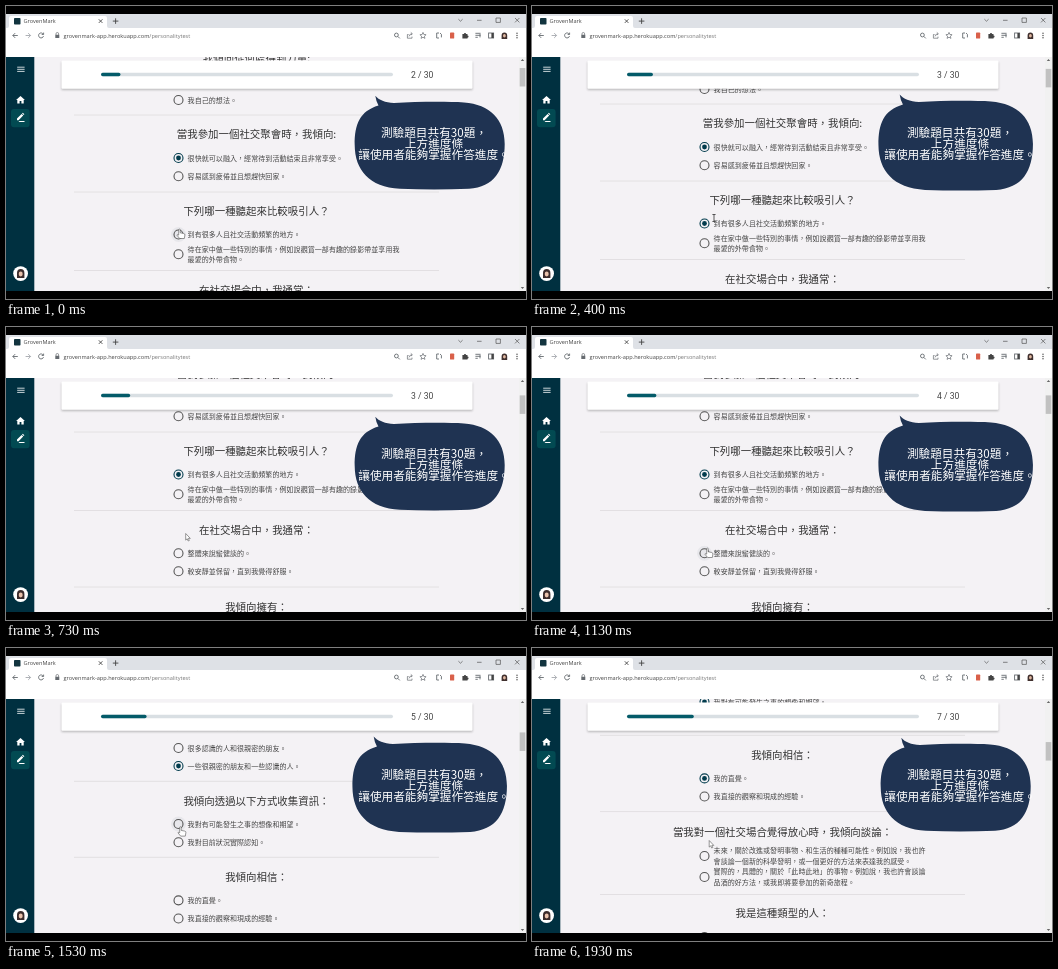
An HTML page for the animation above (1990 ms loop, 520 by 293 pixels).

```html
<!DOCTYPE html>
<html lang="zh-TW">
<head>
<meta charset="utf-8">
<title>Personality test</title>
<style>
html, body { margin: 0; width: 100%; height: 100%; overflow: hidden; background: #000; }
svg { display: block; width: 520px; height: 293px; }
text { font-family: "Noto Sans CJK TC", "Noto Sans CJK", "Noto Sans CJK JP", sans-serif; white-space: pre; }
.ui { font-family: "Open Sans", "Noto Sans", sans-serif; font-size: 5.6px; }
.head { font-size: 10.45px; font-weight: 300; fill: #333; text-anchor: middle; }
.opt { font-size: 7px; font-weight: 300; letter-spacing: .066px; fill: #444; }
.say { font-size: 11.67px; fill: #fff; text-anchor: middle; }
.ico { fill: none; stroke: #666b70; stroke-width: .9; }
.cur { fill: #fff; stroke: #555; stroke-width: .6; stroke-linejoin: round; }
</style>
</head>
<body>
<svg viewBox="0 0 520 293" xmlns="http://www.w3.org/2000/svg">
  <defs>
    <clipPath id="view"><rect x="28" y="51" width="485" height="234"/></clipPath>
    <filter id="soft" x="-5%" y="-30%" width="110%" height="170%"><feGaussianBlur stdDeviation="1.2"/></filter>
  </defs>
  <rect width="520" height="293"/>
  <rect y="8" width="520" height="277" fill="#fff"/>

  <!-- browser bar -->
  <rect y="8" width="520" height="14" fill="#dee1e6"/>
  <path d="M1 22q2 0 2-2v-8q0-2 2-2h94q2 0 2 2v8q0 2 2 2z" fill="#fff"/>
  <rect x="8" y="12" width="6.5" height="6.5" rx=".8" fill="#12343f"/>
  <text class="ui" x="17.5" y="17.4" fill="#444">GrovenMark</text>
  <g class="ico">
    <path d="M92.8 13.3l3.6 3.6m0-3.6l-3.6 3.6M106.8 15.1h5.6m-2.8-2.8v5.6" stroke="#444"/>
    <path d="M452.4 13.2l2.1 2 2.1-2M471 14.3h4.6M490 12h4.4v4.4h-4.4zM509 12l4.4 4.4m0-4.4l-4.4 4.4" stroke="#555" stroke-width=".7"/>
    <path d="M11.8 29.5h-5m2.4-2.4l-2.4 2.4 2.4 2.4"/>
    <path d="M19.6 29.5h5m-2.4-2.4l2.4 2.4-2.4 2.4" stroke="#a5a9ae"/>
    <path d="M37.2 28.1a2.5 2.5 0 1 0 .3 2M37.6 26.6v1.9h-1.9"/>
    <path d="M50 29v-1.2a1.3 1.3 0 0 1 2.6 0V29" stroke-width=".7"/>
    <rect x="49.3" y="28.8" width="4" height="3.2" fill="#666b70" stroke="none"/>
    <circle cx="390.4" cy="29" r="1.9"/><path d="M391.8 30.4l2 2"/>
    <path d="M402.6 28.5h-1.2v3.7h4.6v-1.6M403 30.4q.4-2.6 3-2.6m-1.2-1.4l1.6 1.4-1.6 1.4" stroke-width=".7"/>
    <path d="M417 26.4l.9 2.1 2.2.2-1.7 1.5.5 2.2-1.9-1.2-1.9 1.2.5-2.2-1.7-1.5 2.2-.2z" stroke-width=".7"/>
    <path d="M433 27h-2.3v5h2.3M434 27q2.2.6 1.4 4.4"/>
  </g>
  <rect x="444" y="26.6" width="4.2" height="6" rx=".7" fill="#d9604a"/>
  <path d="M456.4 28h1.5a1.1 1.1 0 0 1 2.2 0h1.4v1.5a1.1 1.1 0 0 1 0 2.2v.8h-5.1z" fill="#444"/>
  <path class="ico" d="M469.4 27.3h5.2M469.4 29.3h5.2M469.4 31.3h2.4M474 28v3.4"/>
  <rect class="ico" x="482.6" y="27" width="5" height="5"/><path d="M485.4 27h2.2v5h-2.2z" fill="#444"/>
  <path d="M495.6 33v-3.5a2.8 3 0 0 1 5.6 0V33z" fill="#40302e"/>
  <ellipse cx="498.4" cy="29.8" rx="1.4" ry="1.7" fill="#e0b9a2"/>
  <g fill="#444"><circle cx="511" cy="27.2" r=".7"/><circle cx="511" cy="29.5" r=".7"/><circle cx="511" cy="31.8" r=".7"/></g>
  <text class="ui" x="57.5" y="31.5" fill="#444">grovenmark-app.herokuapp.com<tspan fill="#777">/personalitytest</tspan></text>

  <!-- page -->
  <rect x="28" y="51" width="485" height="234" fill="#f4f2f5"/>
  <g clip-path="url(#view)">
    <g id="page"></g>
    <rect x="55.5" y="56" width="411" height="28" fill="#000" opacity=".24" filter="url(#soft)"/>
    <rect x="55.5" y="54.5" width="411" height="28.3" rx="1" fill="#fff"/>
  </g>
  <rect x="95" y="66.8" width="292" height="3.4" rx="1.7" fill="#d9dfe3"/>
  <rect id="bar" x="95" y="66.8" height="3.4" rx="1.7" fill="#045b69"/>
  <text id="count" x="405" y="71.7" font-size="8.6" fill="#444" style="font-family:Roboto,sans-serif"></text>

  <!-- scrollbar -->
  <rect x="513" y="51" width="7" height="234" fill="#f1f1f1"/>
  <path d="M514.8 55l1.7-2 1.7 2zM514.8 281l1.7 2 1.7-2z" fill="#666"/>
  <rect id="thumb" x="513.7" width="5.6" height="18.5" fill="#c1c1c1"/>

  <!-- sidebar -->
  <rect y="51" width="28.3" height="234" fill="#003040"/>
  <rect x="5" y="103" width="18.6" height="18.3" rx="3" fill="#024a52"/>
  <path d="M11.2 61.2h7.4M11.2 63.3h7.4M11.2 65.4h7.4" stroke="#dfe6e8" stroke-width=".9"/>
  <path d="M14.5 90l4.4 4h-1.2v3.4h-2.3v-2.4h-1.8v2.4h-2.3V94h-1.2z" fill="#fff"/>
  <path d="M11 114.2v-1.6l4.6-4.6 1.6 1.6-4.6 4.6zM16 107.5l.8-.8 1.6 1.6-.8.8zM13.5 115h5v1h-6z" fill="#fff"/>
  <circle cx="14.6" cy="267.6" r="7.4" fill="#fff"/>
  <path d="M11 272v-5a3.7 3.9 0 0 1 7.4 0v5z" fill="#3c2c2c"/>
  <ellipse cx="14.7" cy="268" rx="2" ry="2.4" fill="#e9c1ab"/>

  <!-- caption -->
  <path id="bubble" fill="#1f3352" d="M369.3 89.7C373 94 379 96.6 388 97C410 95.600 440 95.400 458 96.400C484 98.500 498.600 113 498.700 138C498.600 165 488 181 463 182.800Q428 184 394 182.800C363 181 348.900 164 348.700 139C348.500 118 354 105 372.500 99.500Q370 95 369.300 89.700Z"/>
  <text class="say" x="428" y="130.500">測驗題目共有30題，</text>
  <text class="say" x="428" y="142">上方進度條</text>
  <text class="say" x="428" y="153.300">讓使用者能夠掌握作答進度。</text>

  <g id="pointer">
    <path class="cur" id="hand" d="M-2.300 -4.500q.8-.8 1.500 0V-1.200l3.600.7q1.200.3 1.100 1.500L3.300 4.500h-4.600L-4 1.300q-.3-1.200 1.700-.2z"/>
    <path class="cur" id="arrow" d="M-.8-3.500v6.600l1.500-1.300 1 2.200 1.100-.5-1-2.100h2z"/>
    <path id="beam" d="M-1.600-3.500h3.200M0-3.500v7M-1.600 3.500h3.200" fill="none" stroke="#333" stroke-width=".8"/>
  </g>
</svg>
<script>
const LOOP = 1990, TICK = 200 / 3, NEVER = 1e9;
const $ = id => document.getElementById(id);

// title y, title, divider y, options: [y, lines, time chosen]
const questions = [
  [52, "我傾向從何處得到力量:", 109, [[76, ["他人的想法。"], 0], [94, ["我自己的想法。"]]]],
  [128, "當我參加一個社交聚會時，我傾向:", 186, [
    [152, ["很快就可以融入，經常待到活動結束且非常享受。"], 0],
    [170.3, ["容易感到疲倦並且想趕快回家。"]]]],
  [205, "下列哪一種聽起來比較吸引人？", 264.5, [
    [228.5, ["到有很多人且社交活動頻繁的地方。"], 330],
    [248.2, ["待在家中做一些特別的事情，例如說觀賞一部有趣的錄影帶並享用我", "最愛的外帶食物。"]]]],
  [284, "在社交場合中，我通常：", 341, [
    [307.2, ["整體來說蠻健談的。"], 1190],
    [325.3, ["較安靜並保留，直到我覺得舒服。"]]]],
  [360.5, "我傾向擁有：", 417.3, [
    [384, ["很多認識的人和很親密的朋友。"]],
    [402, ["一些很親密的朋友和一些認識的人。"], 1440]]],
  [437, "我傾向透過以下方式收集資訊：", 493.3, [
    [460, ["我對有可能發生之事的想像和期望。"], 1580],
    [478.3, ["我對目前狀況實際認知。"]]]],
  [512.8, "我傾向相信：", 569.6, [
    [536.4, ["我的直覺。"], 1830],
    [554.5, ["我直接的觀察和現成的經驗。"]]]],
  [589.5, "當我對一個社交場合覺得放心時，我傾向談論：", 652.5, [
    [614, ["未來，關於改進或發明事物、和生活的種種可能性。例如說，我也許", "會談論一個新的科學發明，或一個更好的方法來表達我的感受。"]],
    [635, ["實際的，具體的，關於「此時此地」的事物。例如說，我也許會談論", "品酒的好方法，或我即將要參加的新奇旅程。"]]]],
  [671, "我是這種類型的人：", 728, [[695, ["喜歡先看到整體。"]]]]
];

const scrolls = [[0, 0], [367, 0], [400, 11], [467, 58], [533, 81], [1200, 81], [1333, 203],
  [1440, 203], [1533, 284], [1600, 284], [1733, 365.6], [1830, 365.6], [1920, 406]];
const moves = [[0, 175, 228], [270, 175, 228], [400, 182, 212], [733, 180.5, 210], [867, 180, 211],
  [1000, 177, 226], [1200, 177, 226], [1333, 178.5, 213.5], [1400, 176, 200], [1467, 176, 198],
  [1550, 176, 180], [1733, 176.3, 183.5], [1830, 176.3, 183.5], [1933, 178, 196]];
const shapes = [[0, "hand"], [330, "beam"], [500, "arrow"], [900, "hand"], [1230, "arrow"], [1370, "hand"], [1860, "arrow"]];
const hovers = [[0, 228.5], [380, NEVER], [1000, 307.2], [1260, 402], [1500, 460], [1640, 536.4], [1860, NEVER]];
const clicks = [270, 1130, 1400, 1535, 1765];

const lerp = (table, t, col = 1) => {
  const i = table.findIndex(row => row[0] > t);
  if (i < 0) return table[table.length - 1][col];
  const a = table[i - 1], b = table[i];
  return a[col] + (b[col] - a[col]) * (t - a[0]) / (b[0] - a[0]);
};
const latest = (table, t) => table.filter(row => row[0] <= t).pop()[1];

const radio = (y, at = NEVER) => `<g class="radio" data-at="${at}">
  <circle cx="172.5" cy="${y}" r="4.5" fill="none" stroke-width="1.1"/>
  <circle cx="172.5" cy="${y}" r="2.4" fill="#023c4d"/></g>`;
const option = ([y, lines, at]) => radio(y, at) + lines.map((s, i) =>
  `<text class="opt" x="181.6" y="${y + 2.6 + (i - (lines.length - 1) / 2) * 10.4}">${s}</text>`).join("");

$("page").innerHTML = `<circle id="ripple" cx="172.5" r="7.5" fill="#003040" opacity=".05"/>` +
  questions.map(([y, title, rule, options]) =>
    `<text class="head" x="250.5" y="${y + 4.1}">${title}</text>` + options.map(option).join("") +
    `<path d="M68 ${rule}H433" stroke="#dddbde" stroke-width=".8"/>`).join("");
const radios = [...document.querySelectorAll(".radio")];

function draw(t) {
  const top = lerp(scrolls, t);
  $("page").setAttribute("transform", `translate(0 ${-top})`);
  $("thumb").setAttribute("y", 62 + top * .079);
  $("ripple").setAttribute("cy", latest(hovers, t));

  for (const r of radios) {
    const on = t >= +r.dataset.at;
    r.children[0].setAttribute("stroke", on ? "#023c4d" : "#555");
    r.children[1].style.display = on ? "" : "none";
  }

  const done = 2 + clicks.filter(c => c <= t).length;
  const shown = clicks.reduce((n, c) => n + Math.min(1, Math.max(0, (t - c) / 195)), 2);
  $("count").textContent = `${done} / 30`;
  $("bar").setAttribute("width", 292 * shown / 30);

  const big = Math.floor(t / 300) % 2;
  $("bubble").setAttribute("transform", big ? "translate(423.7 137) scale(1.03 1.025) translate(-423.7 -137)" : "");

  $("pointer").setAttribute("transform", `translate(${lerp(moves, t)} ${lerp(moves, t, 2)})`);
  const shape = latest(shapes, t);
  for (const id of ["hand", "arrow", "beam"]) $(id).style.display = id === shape ? "" : "none";
}

const start = performance.now();
function frame() {
  const t = (performance.now() - start) % LOOP;
  draw(Math.floor((t + 5) / TICK) * TICK);
  requestAnimationFrame(frame);
}
frame();
</script>
</body>
</html>
```
